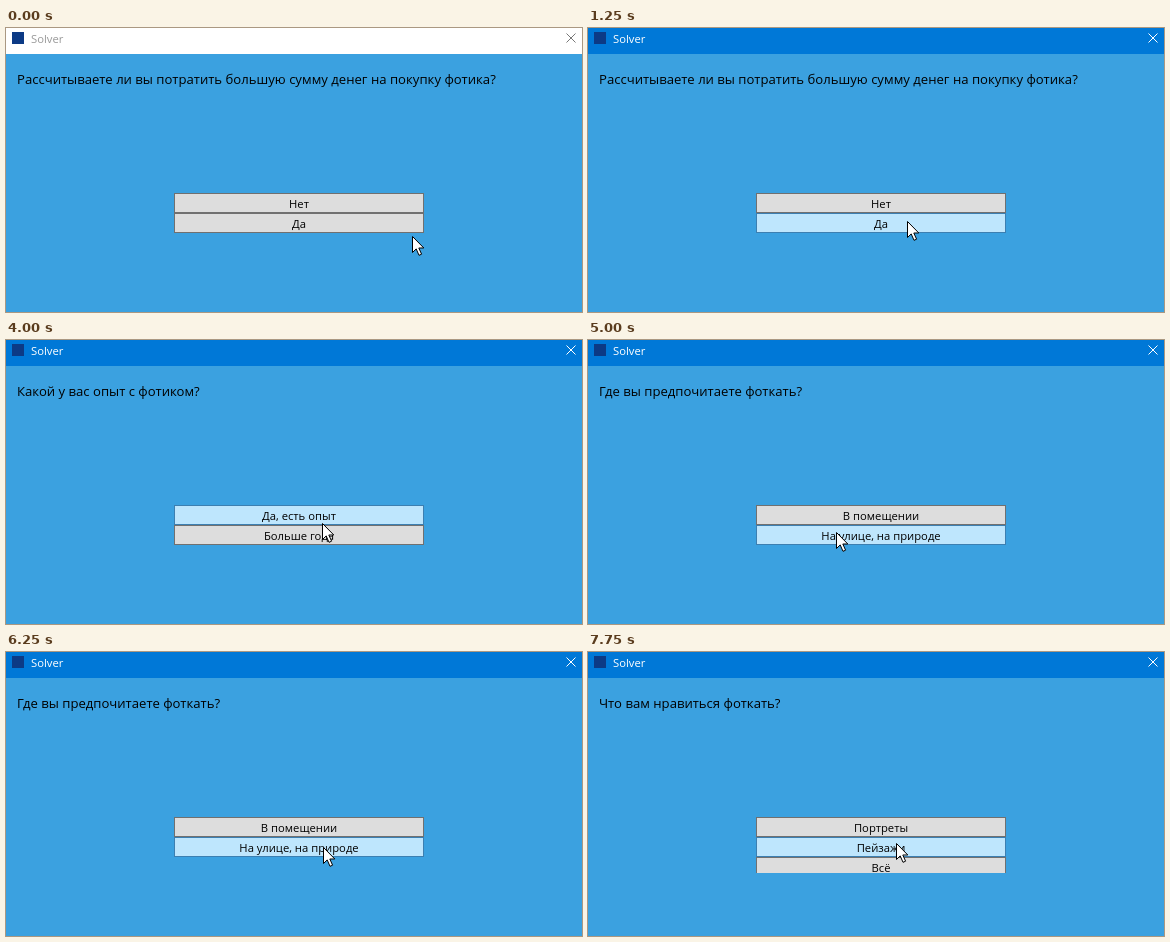
These frames come from a looping animation (576x284 px, 8 s). An HTML page:

```html
<!DOCTYPE html>
<html lang="ru">
<head>
<meta charset="utf-8">
<title>Solver</title>
<style>
html, body { margin: 0; width: 100%; height: 100%; overflow: hidden; background: #3ba1e0; }
svg { display: block; width: 576px; height: 284px; }
text { font: 11.25px "Open Sans", "Noto Sans", sans-serif; fill: #000; }
.ask { font-size: 13.13px; }
.opt { text-anchor: middle; }
.btn { fill: #ddd; stroke: #707070; }

/* One step is 250 ms, or 3.125% of the loop. */
.bar, .name, .cross, .scene, .hover, .cursor { animation: 8s step-end infinite; }
.bar { animation-name: bar; }
.name { animation-name: name; }
.cross { fill: none; animation-name: cross; }
.hover { fill: #bee6fd; stroke: #3c7fb1; animation-name: hover; }
.cursor { fill: #fff; stroke: #000; animation-name: move; }
.s1 { animation-name: s1; }
.s2 { animation-name: s2; }
.s3 { animation-name: s3; }
.s4 { animation-name: s4; }
.s5 { animation-name: s5; }

@keyframes bar { 0% { fill: #fff; } 6.25%, 100% { fill: #0078d7; } }
@keyframes name { 0% { fill: #999; } 6.25%, 100% { fill: #fff; } }
@keyframes cross { 0% { stroke: #777; } 6.25%, 100% { stroke: #fff; } }

@keyframes s1 { 0% { visibility: visible; } 18.75%, 100% { visibility: hidden; } }
@keyframes s2 { 0%, 34.375%, 100% { visibility: hidden; } 18.75% { visibility: visible; } }
@keyframes s3 { 0%, 53.125%, 100% { visibility: hidden; } 34.375% { visibility: visible; } }
@keyframes s4 { 0%, 81.25%, 100% { visibility: hidden; } 53.125% { visibility: visible; } }
@keyframes s5 { 0% { visibility: hidden; } 81.25%, 100% { visibility: visible; } }

@keyframes hover {
  0%, 56.25%, 65.625%, 87.5% { visibility: hidden; transform: translateY(0); }
  50%, 71.875% { visibility: visible; transform: translateY(0); }
  12.5%, 59.375%, 75%, 93.75%, 100% { visibility: visible; transform: translateY(20px); }
  84.375%, 90.625% { visibility: visible; transform: translateY(40px); }
}

@keyframes move {
  0% { transform: translate(406px, 208px); }
  3.125% { transform: translate(395px, 219px); }
  6.25% { transform: translate(372px, 219px); }
  9.375% { transform: translate(345px, 210px); }
  12.5% { transform: translate(323px, 198px); }
  15.625% { transform: translate(319px, 193px); }
  18.75% { transform: translate(319px, 201px); }
  21.875% { transform: translate(308px, 194px); }
  28.125% { transform: translate(319px, 194px); }
  46.875% { transform: translate(317px, 188px); }
  50% { transform: translate(316px, 183px); }
  56.25% { transform: translate(420px, 190px); }
  59.375% { transform: translate(409px, 192px); }
  62.5% { transform: translate(248px, 192px); }
  65.625% { transform: translate(129px, 185px); }
  68.75% { transform: translate(150px, 159px); }
  71.875% { transform: translate(230px, 180px); }
  75% { transform: translate(300px, 200px); }
  78.125% { transform: translate(317px, 195px); }
  81.25% { transform: translate(317px, 197px); }
  84.375% { transform: translate(370px, 212px); }
  87.5% { transform: translate(421px, 216px); }
  90.625% { transform: translate(400px, 209px); }
  93.75% { transform: translate(340px, 200px); }
  96.875%, 100% { transform: translate(308px, 191px); }
}
</style>
</head>
<body>
<svg viewBox="0 0 576 284">
  <defs>
    <clipPath id="panel"><rect x="168" y="165" width="250" height="56"/></clipPath>
    <rect id="box" x="168.5" y="165.5" width="249" height="19"/>
  </defs>

  <rect width="576" height="284" fill="#3ba1e0"/>
  <rect class="bar" width="576" height="26"/>
  <rect x="6" y="4" width="12" height="12" fill="#0c3a85"/>
  <text class="name" x="25" y="15">Solver</text>
  <path class="cross" d="M560.5 5.5l9 9m0-9l-9 9"/>

  <g clip-path="url(#panel)">
    <use class="btn" href="#box"/>
    <use class="btn" href="#box" y="20"/>
    <g class="scene s5"><use class="btn" href="#box" y="40"/></g>
    <g class="hover"><use href="#box"/></g>
  </g>

  <g class="scene s1">
    <text class="ask" x="11" y="56">Рассчитываете ли вы потратить большую сумму денег на покупку фотика?</text>
    <text class="opt" x="293" y="180">Нет</text>
    <text class="opt" x="293" y="200">Да</text>
  </g>
  <g class="scene s2">
    <text class="ask" x="11" y="56">Вы собираетесь заниматься фотографией профессионально?</text>
    <text class="opt" x="293" y="180">Нет</text>
    <text class="opt" x="293" y="200">Да</text>
  </g>
  <g class="scene s3">
    <text class="ask" x="11" y="56">Какой у вас опыт с фотиком?</text>
    <text class="opt" x="293" y="180">Да, есть опыт</text>
    <text class="opt" x="293" y="200">Больше года</text>
  </g>
  <g class="scene s4">
    <text class="ask" x="11" y="56">Где вы предпочитаете фоткать?</text>
    <text class="opt" x="293" y="180">В помещении</text>
    <text class="opt" x="293" y="200">На улице, на природе</text>
  </g>
  <g class="scene s5">
    <text class="ask" x="11" y="56">Что вам нравиться фоткать?</text>
    <text class="opt" x="293" y="180">Портреты</text>
    <text class="opt" x="293" y="200">Пейзажи</text>
    <text class="opt" x="293" y="220">Всё</text>
  </g>

  <path class="cursor" d="M.5 .5V16.5l3.7-3.6 2.8 6.4 2.6-1.1-2.8-6.2h5z"/>
</svg>
</body>
</html>
```
